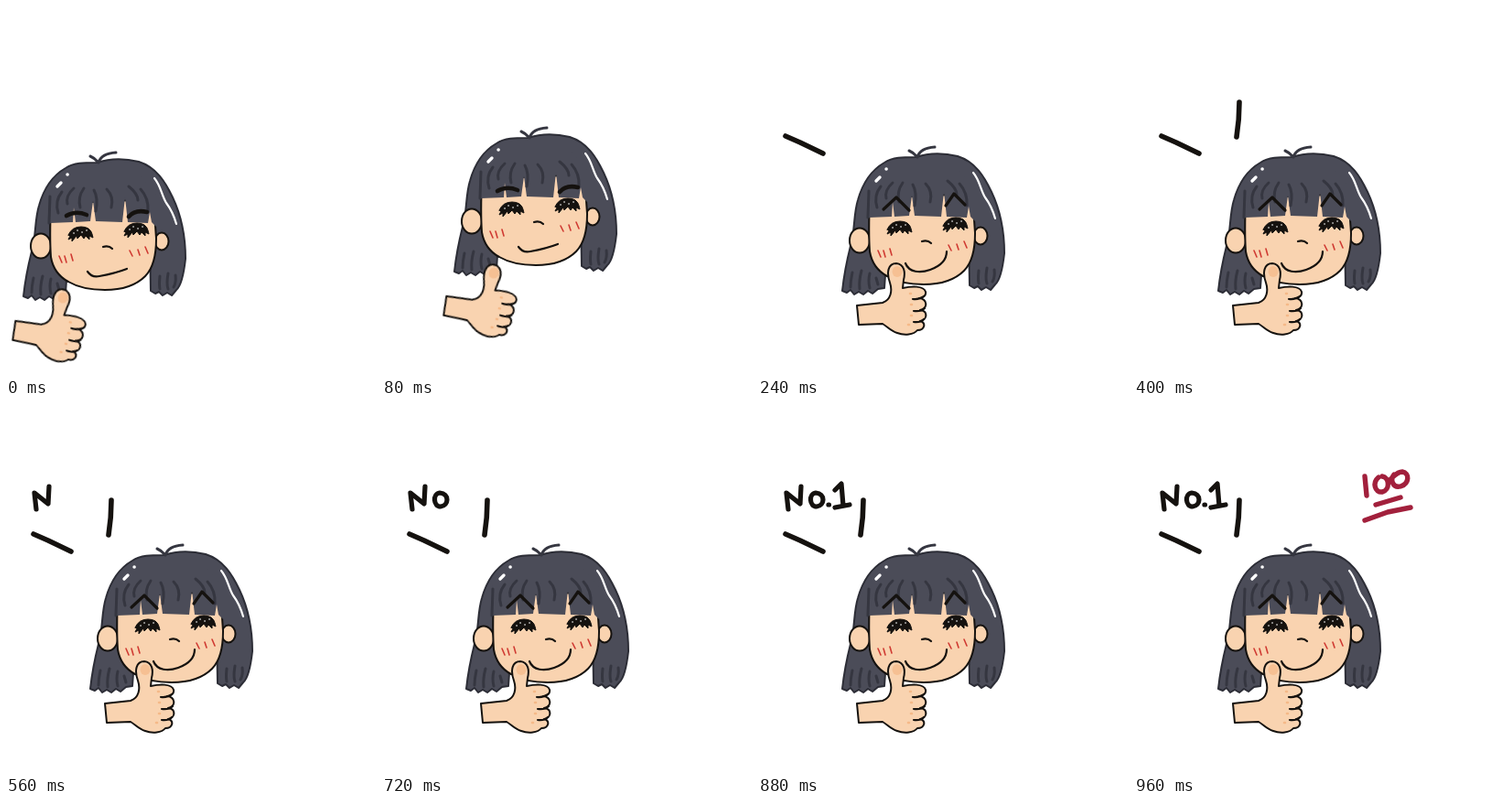
Animation, 404 px wide and 404 px high, one loop 1280 ms. Source, as an HTML page without scripts:

```html
<!DOCTYPE html>
<html lang="en">
<head>
<meta charset="utf-8">
<title>Thumbs up</title>
<style>
html, body { margin: 0; width: 100%; height: 100%; overflow: hidden; background: #fff; }
svg { display: block; width: 100vw; height: 100vh; }
path, ellipse { stroke-linecap: round; stroke-linejoin: round; }
.line { fill: none; stroke: #15120f; stroke-width: 2.2; }
.skin { fill: #f9d3b0; stroke: #15120f; stroke-width: 2; }
.hair { fill: #4b4c58; stroke: #2c2d36; stroke-width: 2; }
.bangs { fill: #4b4c58; }
.strand { fill: none; stroke: #353640; stroke-width: 3; }
.shine { fill: none; stroke: #fff; stroke-width: 2.2; }
.blush { fill: none; stroke: #d03a32; stroke-width: 1.6; }
.brow { stroke-width: 3.2; }
.soft { stroke-width: 4.6; }
.mark { stroke-width: 5.6; }
.letter { stroke-width: 5.2; }
.score { fill: none; stroke: #a2203c; stroke-width: 5.4; }

.head, .hand, .before, .after, .dash, .n, .o, .dot, .one, .score {
  animation: 1280ms step-end infinite;
}
.head { animation-name: head; }
.hand { animation-name: hand; transform-origin: 145px 320px; }
.before { animation-name: before; }
.after { animation-name: after; }
.dash { animation-name: dash; }
.n { animation-name: n; }
.o { animation-name: o; }
.dot { animation-name: dot; }
.one { animation-name: one; }
.score { animation-name: score; }

@keyframes head {
  0% { transform: translate(-73px, 6px); }
  6.25% { transform: translate(-13px, -21px); }
  18.75%, 100% { transform: none; }
}
@keyframes hand {
  0% { transform: translate(-97px, 26px) rotate(14deg); }
  6.25% { transform: translate(-37px, -1px) rotate(14deg); }
  18.75%, 100% { transform: none; }
}
@keyframes before { 0% { visibility: visible; } 18.75%, 100% { visibility: hidden; } }
@keyframes after { 0% { visibility: hidden; } 18.75%, 100% { visibility: visible; } }
@keyframes dash { 0% { visibility: hidden; } 31.25%, 100% { visibility: visible; } }
@keyframes n { 0% { visibility: hidden; } 43.75%, 100% { visibility: visible; } }
@keyframes o { 0% { visibility: hidden; } 56.25%, 100% { visibility: visible; } }
@keyframes dot { 0% { visibility: hidden; } 62.5%, 100% { visibility: visible; } }
@keyframes one { 0% { visibility: hidden; } 68.75%, 100% { visibility: visible; } }
@keyframes score { 0% { visibility: hidden; } 75%, 100% { visibility: visible; } }
</style>
</head>
<body>
<svg viewBox="0 0 404 404" role="img" aria-label="A smiling girl gives a thumbs up: No.1, 100">
  <defs>
    <g id="eye">
      <path d="M-13 0Q-9-9 1-9Q11-9 13-1L14 3L10 1L10 5L6 1L4 4L1 0L-3 4L-4 1L-9 7L-9 3L-13 5L-11 1Z" fill="#15120f" stroke="#15120f"/>
      <path class="shine" style="stroke-width:1.6" d="M-7-2h.1M-3-5h.1M2-3h.1M7-5h.1"/>
    </g>
  </defs>

  <g class="head">
    <path class="hair" d="M172 165C158 165 147 165 138 171C124 179 114 194 109 212C104 228 106 246 101 262C97 278 94 292 92 311L97 313L101 310L105 315L110 312L115 315L120 311L125 314L131 309L138 308L142 250H230L231 305L236 308L240 306L244 310L249 307L254 310L259 304C264 300 267 288 269 270C269 245 264 222 255 203C247 186 237 170 218 164C202 160 187 160 172 165Z"/>
    <path class="strand" d="M103 291Q101 300 101 307M113 289Q110 300 111 309M122 292Q120 300 122 308M129 297L131 304M241 289Q240 299 241 303M250 286Q248 298 250 303M258 288Q259 296 256 301"/>
    <ellipse class="skin" cx="111" cy="256" rx="11" ry="13.5"/>
    <ellipse class="skin" cx="243" cy="251" rx="7.5" ry="9.5"/>
    <path class="skin" d="M122 210C121 235 121 254 122 268C124 280 130 289 141 295C153 302 166 304 181 304C200 304 215 299 225 289C234 280 237 267 237 248L234 205Z"/>
    <path class="bangs" d="M120 195L140 180H220L237 200V235L232 230L230 219L228 231L206 230L203 203L200 230L171 229L168 207L165 229L149 230L147 214L146 230L121 231Z"/>
    <path class="strand" d="M134 197Q126 207 130 220M147 193Q138 201 140 210M158 193Q151 203 154 214M169 195Q174 204 171 218M183 194Q191 202 188 214M207 191Q217 199 217 206M220 194Q229 204 228 218M121 202L120 231"/>
    <path class="strand" d="M165 158Q170 160 174 165Q177 155 193 154"/>
    <path class="shine" style="stroke-width:3.4" d="M129 191L133 187M140 178h.2"/>
    <path class="shine" d="M235 182C242 190 243 201 248 209C254 217 257 225 259 232"/>

    <use href="#eye" x="154" y="244"/>
    <use href="#eye" x="215" y="240"/>
    <path class="line" d="M179 257Q185 255 189 259"/>
    <path class="blush" d="M131 267L134 274M137 267L139 274M144 265L146 272M208 261L211 267M217 260L219 266M225 257L228 264"/>

    <g class="before">
      <path class="line soft" d="M139 223Q149 217 161 222M207 224Q214 216 227 219"/>
      <path class="line" d="M162 284Q167 291 175 289Q192 286 205 281"/>
    </g>
    <g class="after">
      <path class="line brow" d="M137 222L151 209L165 223M205 218L214 205L226 217"/>
      <path class="line" d="M161 281C165 291 177 292 188 288C199 284 206 277 206 268"/>
    </g>
  </g>

  <g class="hand">
    <path class="skin" d="M108 327L136 324C145 321 147 311 144 302C140 291 142 281 151 281C160 282 161 291 159 299L158 308C167 306 181 305 183 312C184 316 180 319 176 319C185 320 186 330 177 332C186 333 185 343 177 344C184 346 182 354 174 354C170 359 160 360 152 357C145 355 141 350 136 347L110 348Z"/>
    <path class="line" d="M169 320Q176 321 181 317M170 333Q178 334 182 330M170 345Q177 346 181 342"/>
    <ellipse cx="152" cy="290" rx="5.5" ry="6" fill="#f6c093"/>
    <path fill="none" stroke="#f5b988" stroke-width="2.6" d="M166 314h1M167 326h1M167 338h1M164 348h1"/>
  </g>

  <path class="line mark after" d="M30 142L46 149L71 161"/>
  <path class="line mark dash" d="M115 105Q115 124 112 143"/>
  <path class="line letter n" d="M33 115L31 97L46 109L47 90"/>
  <path class="line letter o" d="M63 97C55 98 56 112 64 112C73 111 74 98 63 97"/>
  <path class="line letter dot" d="M77 110h.5"/>
  <path class="line letter one" d="M84 94L91 87L93 111M84 113L100 110"/>
  <path class="score" d="M252 79L254 100M267 80C260 86 263 97 271 96C280 94 279 80 271 79M284 77C279 83 283 92 291 90C301 87 301 75 293 74C287 74 284 79 279 83M264 110L291 102M252 127L277 118L302 113"/>
</svg>
</body>
</html>
```
